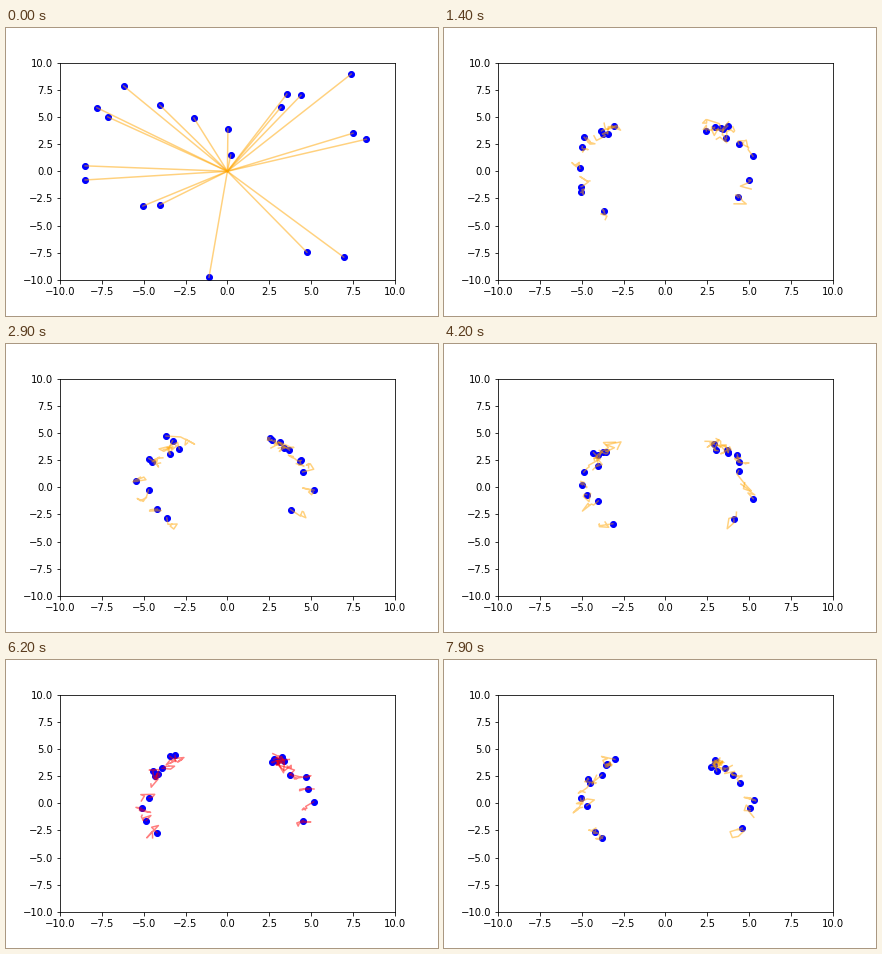
These frames come from a looping animation (432 px wide and 288 px high, 8000 ms). A matplotlib script:

```python
import matplotlib.pyplot as plt
import numpy as np
from matplotlib.animation import FuncAnimation

FRAMES, INTERVAL = 80, 100
TRAIL = 6                 # positions kept in each trail
RED_SPAN = range(62, 75)  # steps with red trails
RADIUS = 4.95             # ring on which the swarm settles
SETTLE = 4.5              # time constant of the approach, in steps

# Starting points of the left and right halves, each from top to bottom.
LEFT = [(-2.0, 4.9), (-4.05, 6.1), (-6.2, 7.85), (-7.8, 5.85), (-7.15, 5.0),
        (-8.5, .5), (-8.5, -.8), (-5.05, -3.2), (-4.05, -3.1), (-1.1, -9.75)]
RIGHT = [(.03, 3.9), (3.2, 5.9), (3.55, 7.1), (4.4, 7.0), (7.4, 8.95),
         (.2, 1.5), (7.5, 3.5), (8.3, 2.95), (6.95, -7.9), (4.75, -7.45)]

rng = np.random.default_rng(11)


def arc(count, top, sweep, power):
    """Angles down one side of the ring, crowded towards the top."""
    return np.radians(top - sweep * np.linspace(0, 1, count) ** power)


def wander(count, spread, keep):
    """Random walks from zero that are pulled back to a given spread."""
    kicks = rng.normal(0, spread * np.sqrt(1 - keep ** 2), (FRAMES, count))
    walk = np.zeros((FRAMES, count))
    for k in range(1, FRAMES):
        walk[k] = keep * walk[k - 1] + kicks[k]
    return walk


def simulate():
    """Positions of all particles at every step, as (step, particle, xy)."""
    start = np.array(LEFT + RIGHT)
    count = len(start)
    home = np.concatenate([np.pi - arc(len(LEFT), 50, 95, 1.9),
                           arc(len(RIGHT), 51, 80, 3)])
    angle = home + wander(count, 0.11, 0.8)
    radius = RADIUS + wander(count, 0.28, 0.35)
    ring = np.stack([radius * np.cos(angle), radius * np.sin(angle)], axis=-1)
    pull = np.exp(-np.arange(FRAMES) / SETTLE)[:, None, None]
    return ring + (start - ring) * pull


walk = simulate()
count = walk.shape[1]
history = np.concatenate([np.zeros((TRAIL - 1, count, 2)), walk])

fig, ax = plt.subplots(figsize=(6, 4), dpi=72)
fig.subplots_adjust(left=0.125, right=0.9, bottom=0.125, top=0.88)
ax.set(xlim=(-10, 10), ylim=(-10, 10))

dots = ax.scatter(*walk[0].T, color="blue")
trails = [ax.plot([], [], alpha=0.5)[0] for _ in range(count)]


def draw(k):
    dots.set_offsets(walk[k])
    color = "red" if k in RED_SPAN else "orange"
    for i, line in enumerate(trails):
        line.set_data(*history[k:k + TRAIL, i].T)
        line.set_color(color)
    return [dots, *trails]


anim = FuncAnimation(fig, draw, frames=FRAMES, init_func=lambda: draw(0),
                     interval=INTERVAL, repeat=True, repeat_delay=0)
plt.show()
```
